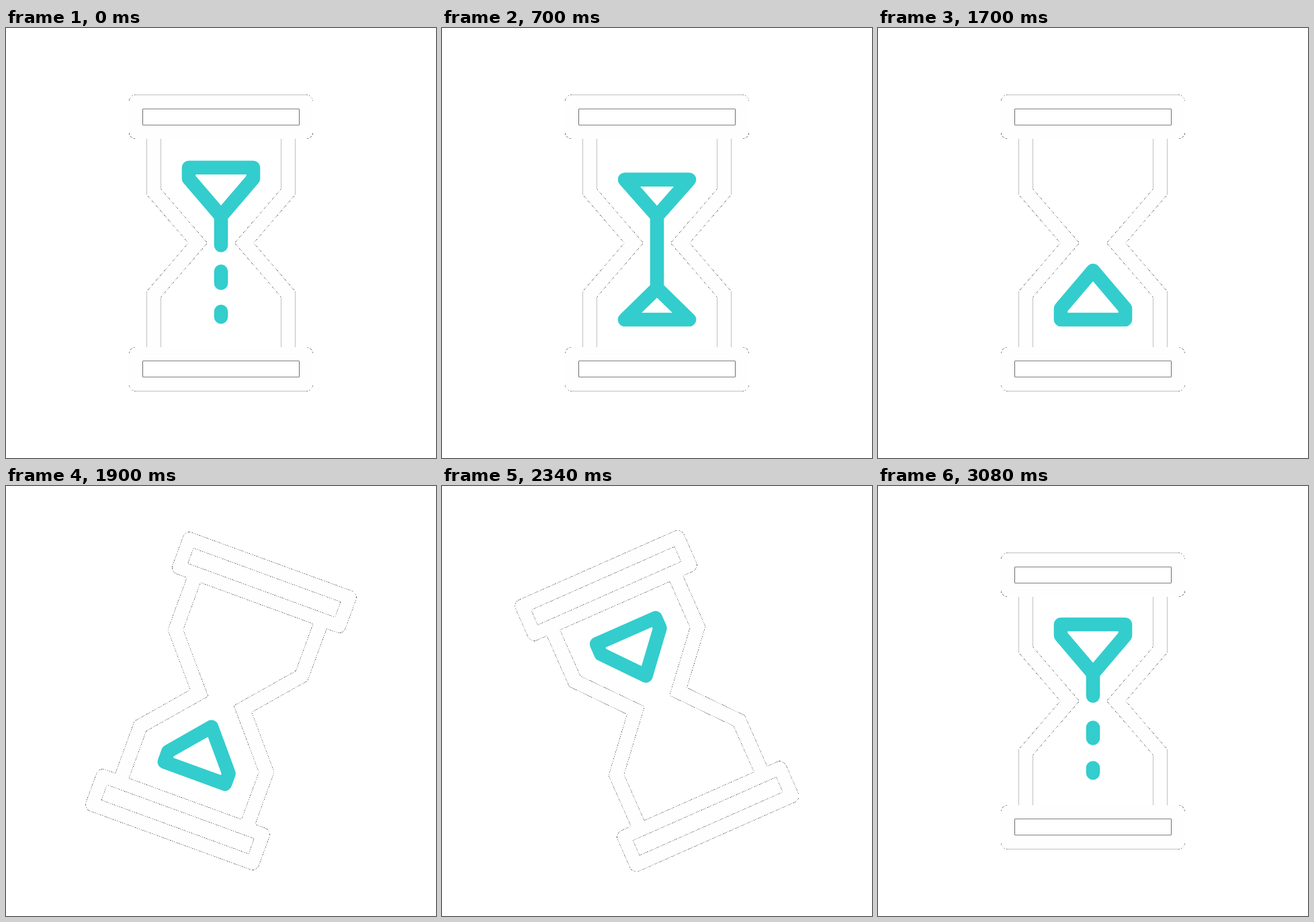
Write an HTML page with a canvas that moves like this. It is 640 by 640 pixels and loops after 3100 ms.

```html
<!DOCTYPE html>
<html lang="en">
<head>
<meta charset="utf-8">
<title>Hourglass</title>
<style>
html, body { margin: 0; width: 100%; height: 100%; overflow: hidden; background: #fff; }
canvas { display: block; }
</style>
</head>
<body>
<canvas id="stage" width="640" height="640"></canvas>
<script>
const LOOP = 3100, STEP = 20, MID = 320;
const ctx = document.getElementById('stage').getContext('2d', { willReadFrequently: true });

// Eased progress from 0 to 1 between times a and b.
const ease = (t, a, b) => {
  const u = Math.min(1, Math.max(0, (t - a) / (b - a)));
  return u * u * (3 - 2 * u);
};
const mix = (a, b, k) => a + (b - a) * k;

const caps = new Path2D();
for (const [outer, inner] of [[99.35, 120.42], [475, 495.42]]) {
  caps.roundRect(183, outer, 274, 65.65, 10);
  caps.rect(203.42, inner, 233.16, 24.16);
}
const walls = new Path2D();
for (const side of [-1, 1]) {
  const wide = MID + side * 100, neck = MID + side * 34.5;
  walls.moveTo(wide, 155);
  walls.lineTo(wide, 243.7);
  walls.lineTo(neck, MID);
  walls.lineTo(wide, 396.3);
  walls.lineTo(wide, 485);
}

function turn(angle) {
  ctx.translate(MID, MID);
  ctx.rotate(angle);
  ctx.translate(-MID, -MID);
}

// White glass whose partly covered edge pixels show dark.
function drawGlass(angle) {
  ctx.clearRect(0, 0, 640, 640);
  ctx.save();
  ctx.beginPath();
  ctx.rect(64, 64, 512, 512);
  ctx.clip();
  turn(angle);
  ctx.fillStyle = ctx.strokeStyle = '#fff';
  ctx.lineWidth = 21.5;
  ctx.fill(caps, 'evenodd');
  ctx.stroke(walls);
  ctx.restore();
  const image = ctx.getImageData(0, 0, 640, 640), px = image.data;
  for (let i = 0; i < px.length; i += 4) {
    const alpha = px[i + 3];
    px[i] = px[i + 1] = px[i + 2] = alpha < 80 ? 255 : Math.min(alpha, 254);
    px[i + 3] = 255;
  }
  ctx.putImageData(image, 0, 0);
}

// Closed heap of sand: flat side, bend of the sides, tip.
function heap(flat, bend, tip, half) {
  ctx.beginPath();
  ctx.moveTo(MID - half, flat);
  ctx.lineTo(MID + half, flat);
  ctx.lineTo(MID + half, bend);
  ctx.lineTo(MID, tip);
  ctx.lineTo(MID - half, bend);
  ctx.closePath();
  ctx.stroke();
}

function stream(from, to) {
  ctx.beginPath();
  ctx.moveTo(MID, from);
  ctx.lineTo(MID, Math.max(to, from + 0.01));
  ctx.stroke();
}

function drawFlow(t) {
  const s = t / 1000, late = Math.max(0, s - 0.7), early = Math.min(s, 0.7);
  const level = 207.7 + 36.5 * early * early + 51 * late + 130 * late * late;
  const tip = mix(434, 361, ease(t, 80, 1120));

  if (level < 280) heap(level, Math.max(level, 224), 280, Math.min(48, (280 - level) * 48 / 54));
  if (t > 80) heap(434, mix(434, 417.5, ease(t, 700, 1320)), tip, 48 * ease(t, 80, 540));

  const top = Math.max(level, 280);
  if (top < tip) stream(top, Math.min(tip, 323.5 + 400 * s));
  for (const [a, b] of [[362.3, 379.7], [422, 430]]) {
    const from = a + 150 * s;
    if (from < tip) stream(from, Math.min(tip, b + 150 * s));
  }
}

function drawDrips(t) {
  const k = ease(t, 2525, 3145) / 0.969;
  for (const [a, b] of [[0, 36.5], [83.5, 99.5], [143.5, 151]]) stream(276 + a * k, 276 + b * k);
}

function draw(now) {
  const t = Math.floor(now % LOOP / STEP) * STEP;
  const angle = Math.PI * ease(t, 1738, 2518);
  drawGlass(angle);
  ctx.save();
  ctx.strokeStyle = '#33cdcd';
  ctx.lineWidth = 20.6;
  ctx.lineCap = ctx.lineJoin = 'round';
  if (t < 1640) {
    drawFlow(t);
  } else {
    if (t > 2525) drawDrips(t);
    turn(angle);
    heap(434, 417.5, 361, 48);
  }
  ctx.restore();
}

let start;
function tick(now) {
  start ??= now;
  draw(now - start);
  requestAnimationFrame(tick);
}
draw(0);
requestAnimationFrame(tick);
</script>
</body>
</html>
```
